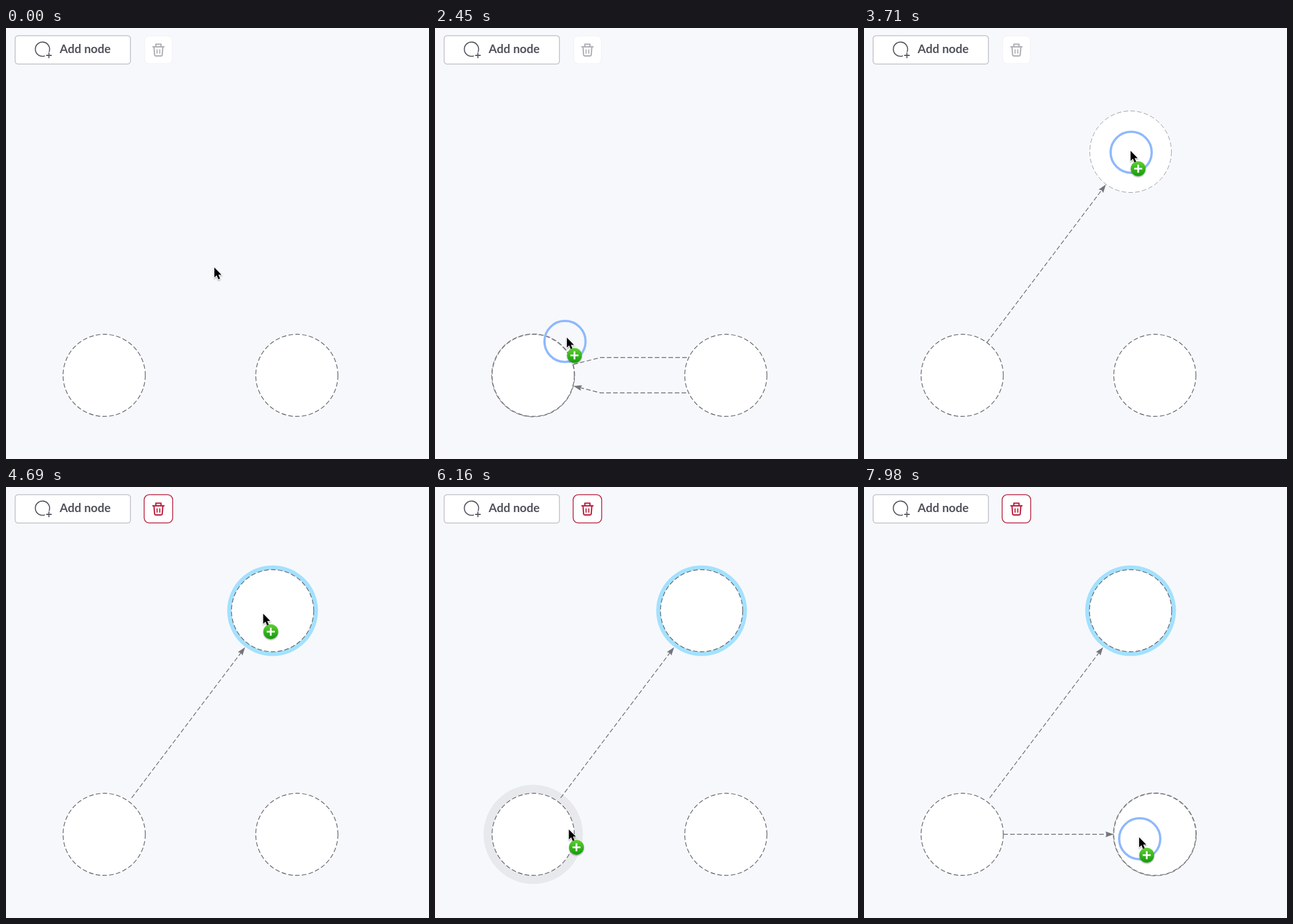
Animation, 741 px wide and 756 px high, one loop 8000 ms. Source, as an HTML page:

```html
<!DOCTYPE html>
<html lang="en">
<head>
<meta charset="utf-8">
<title>Node editor</title>
<style>
  html, body { margin: 0; width: 100%; height: 100%; overflow: hidden; background: #f7f8fc; }
  svg { display: block; width: 741px; height: 756px; }
  .label { font: 700 20.8px Lato, sans-serif; fill: #52535c; }
  .node { fill: #fff; stroke: #6c6d74; stroke-width: 1.4; stroke-dasharray: 8 4; }
  .ghost { fill: #fff; stroke: #97989e; stroke-width: 1; stroke-dasharray: 8 4; }
  .twin { fill: none; stroke: #85868c; stroke-width: 1.4; stroke-dasharray: 8 4; }
  .edge { fill: none; stroke: #707178; stroke-width: 1.4; stroke-dasharray: 8 4; }
  .head { fill: #75767d; }
  .soft { fill: #e8e9ed; }
  .icon { fill: none; stroke-width: 2.3; stroke-linecap: round; stroke-linejoin: round; }
</style>
</head>
<body>
<svg viewBox="0 0 741 756">
  <defs>
    <linearGradient id="green" x1="0" y1="0" x2="0" y2="1">
      <stop offset="0" stop-color="#5fd035"/>
      <stop offset="1" stop-color="#149a0c"/>
    </linearGradient>
    <filter id="drop" x="-50%" y="-50%" width="200%" height="200%">
      <feDropShadow dx="0" dy="1.5" stdDeviation="1.3" flood-color="#000" flood-opacity=".38"/>
    </filter>
    <g id="trash" class="icon">
      <path d="M257.3 33H276.7M262.5 32.5V28.3H271.5V32.5M259.3 33.5L260.3 47Q260.5 49 262.5 49H271.5Q273.5 49 273.7 47L274.7 33.5"/>
      <path d="M264.6 38.3V44.2M269.4 38.3V44.2" stroke-width="2"/>
    </g>
    <path id="head" class="head" d="M0 0L-14.5 -5L-12.5 0L-14.5 5Z"/>
  </defs>
  <rect width="741" height="756" fill="#f7f8fc"/>

  <rect x="16" y="13.5" width="202" height="49.7" rx="5" fill="#fff" stroke="#c0c1c9" stroke-width="1.5"/>
  <g fill="none" stroke="#55565f" stroke-width="1.8" stroke-linecap="round">
    <path d="M67.5 49.1A12.5 12.5 0 1 1 75.6 41.5"/>
    <path d="M71 48H79.4M75.2 43.8V52.2"/>
  </g>
  <text class="label" x="94" y="44">Add node</text>

  <g id="idle">
    <rect x="243" y="14" width="48.3" height="48.7" rx="8" fill="#fff" stroke="#f0f1f4"/>
    <use href="#trash" stroke="#b0b1b6"/>
  </g>
  <g id="armed">
    <rect x="242" y="13.5" width="50" height="49.6" rx="9" fill="#fff" stroke="#b9213f" stroke-width="1.5"/>
    <use href="#trash" stroke="#b9213f"/>
  </g>

  <circle id="halo" class="soft" cx="172" cy="609.3" r="87"/>
  <g id="loop">
    <path class="edge" d="M242.5 590L290 578H500"/>
    <path class="edge" d="M500 640H290L255 631"/>
  </g>
  <g id="link"><path class="edge"/><use href="#head"/></g>
  <g id="pull"><path class="edge"/><use href="#head"/></g>
  <circle id="glow" cx="467" cy="217" r="79.5" fill="#a3e1ff"/>
  <circle id="left" class="node" r="72"/>
  <circle id="right" class="node" r="72"/>
  <circle id="top" class="node" r="72"/>
  <circle id="twin" class="twin" r="72.7"/>
  <use id="loopHead" href="#head" transform="translate(242.5 628)rotate(194)"/>
  <circle id="shade" class="soft" r="72"/>
  <circle id="ghost" class="ghost" r="71.5"/>
  <circle id="ring" r="36" fill="none" stroke="#8fb9fc" stroke-width="4"/>

  <g id="cursor">
    <path d="M0 0V17.6L4 13.8L7 20.8L10 19.5L7.1 12.7H12.4Z" fill="#000" stroke="#fff" stroke-width="1.7" paint-order="stroke" filter="url(#drop)"/>
    <g id="badge" transform="translate(13.3 31.3)">
      <circle r="13" fill="url(#green)" filter="url(#drop)"/>
      <path d="M-7 0H7M0 -7V7" stroke="#fff" stroke-width="3"/>
    </g>
  </g>
</svg>
<script>
const LOOP = 8000, STEP = 70;
const A = { x: 172, y: 609.3 }, B = { x: 509.5, y: 609.3 }, C = { x: 467, y: 217 };
const DROP = 4200, PULL = 6440, JOIN = 7280;

// pointer path: time, x, y
const keys = [
  [0, 365, 420], [70, 365, 420], [420, 300, 481], [770, 300, 481],
  [1470, 219, 553], [1680, 219, 553], [1750, 221, 553], [2170, 221, 553],
  [2450, 231, 543], [2940, 344, 425], [3010, 359, 410], [3600, 467, 215.5],
  [4130, 467, 215.5], [4410, 455, 216], [4620, 455, 216], [5390, 231, 538],
  [5530, 219, 556], [6300, 236, 603], [6370, 236, 603], [6790, 333, 602.5],
  [6860, 339, 603], [6930, 344, 604], [7000, 352, 604.5], [7210, 434, 608],
  [7840, 482, 614.5], [8000, 482, 614.5]
];

const el = {};
document.querySelectorAll("svg [id]").forEach(e => el[e.id] = e);
const show = (e, on) => e.setAttribute("visibility", on ? "visible" : "hidden");
const place = (e, p) => { e.setAttribute("cx", p.x); e.setAttribute("cy", p.y); };
const dist = (p, q) => Math.hypot(p.x - q.x, p.y - q.y);
const clamp = v => Math.min(1, Math.max(0, v));

function slope(i, k) {
  if (i < 1 || i > keys.length - 2) return 0;
  const rate = j => (keys[j + 1][k] - keys[j][k]) / (keys[j + 1][0] - keys[j][0]);
  const a = rate(i - 1), b = rate(i);
  return a * b > 0 ? 2 * a * b / (a + b) : 0;
}

// monotone cubic through the keys
function pointer(t) {
  let i = 0;
  while (i < keys.length - 2 && keys[i + 1][0] <= t) i++;
  const p = keys[i], q = keys[i + 1], d = q[0] - p[0], u = clamp((t - p[0]) / d);
  const axis = k => {
    const v = 1 - u;
    return p[k] * v * v * (1 + 2 * u) + q[k] * u * u * (3 - 2 * u)
      + d * u * v * (slope(i, k) * v - slope(i + 1, k) * u);
  };
  return { x: axis(1), y: axis(2) };
}

function connect(group, p, q, gap) {
  const d = dist(p, q), ux = (q.x - p.x) / d, uy = (q.y - p.y) / d;
  const at = s => (p.x + ux * s) + " " + (p.y + uy * s);
  const [line, head] = group.children;
  line.setAttribute("d", `M${at(gap)}L${at(d - gap - 12)}`);
  head.setAttribute("transform", `translate(${at(d - gap)})rotate(${Math.atan2(uy, ux) * 180 / Math.PI})`);
}

function snap(p) {
  const mid = (A.x + B.x) / 2;
  return {
    x: Math.abs(p.x - mid) < 8 ? mid : p.x,
    y: Math.abs(p.y - A.y) < 10 ? A.y : p.y
  };
}

function draw(time) {
  const t = Math.floor(time / STEP) * STEP;
  const tip = pointer(t), lag = pointer(t - 75), far = pointer(t - 100);
  const free = { x: far.x, y: far.y + 1.5 };
  const first = t >= 2240 && t < DROP, second = t >= PULL;
  const drag = first || second, made = t >= DROP;
  const self = drag && dist(free, A) < 90, joined = t >= JOIN;
  const loose = drag && !self && !joined;
  const spot = joined ? B : second ? snap(free) : free;
  const near = dist(tip, A);

  el.cursor.setAttribute("transform", `translate(${tip.x} ${tip.y})`);
  show(el.badge, t >= 1610);
  place(el.ring, { x: lag.x + 1, y: lag.y + 2.5 });
  show(el.ring, drag);
  show(el.halo, !drag && near > 50 && near < 88);

  show(el.loop, self);
  show(el.loopHead, self);
  show(el.twin, self || joined);
  const host = joined ? B : A;
  el.twin.setAttribute("transform", `translate(${host.x} ${host.y})rotate(4)`);

  place(el.shade, free);
  place(el.ghost, spot);
  show(el.shade, loose && second);
  show(el.ghost, loose);
  const apart = (loose || joined) && dist(A, spot) > 160;
  show(el.pull, apart);
  if (apart) connect(el.pull, A, spot, 72);

  const fade = made ? clamp((t - DROP + STEP) / 280) : 0;
  show(el.link, made);
  show(el.top, made);
  el.glow.setAttribute("opacity", fade);
  el.armed.setAttribute("opacity", fade);
  el.idle.setAttribute("opacity", 1 - fade);
}

place(el.left, A);
place(el.right, B);
place(el.top, C);
connect(el.link, A, C, 80);

function tick() {
  draw(performance.now() % LOOP);
  requestAnimationFrame(tick);
}
tick();
</script>
</body>
</html>
```
